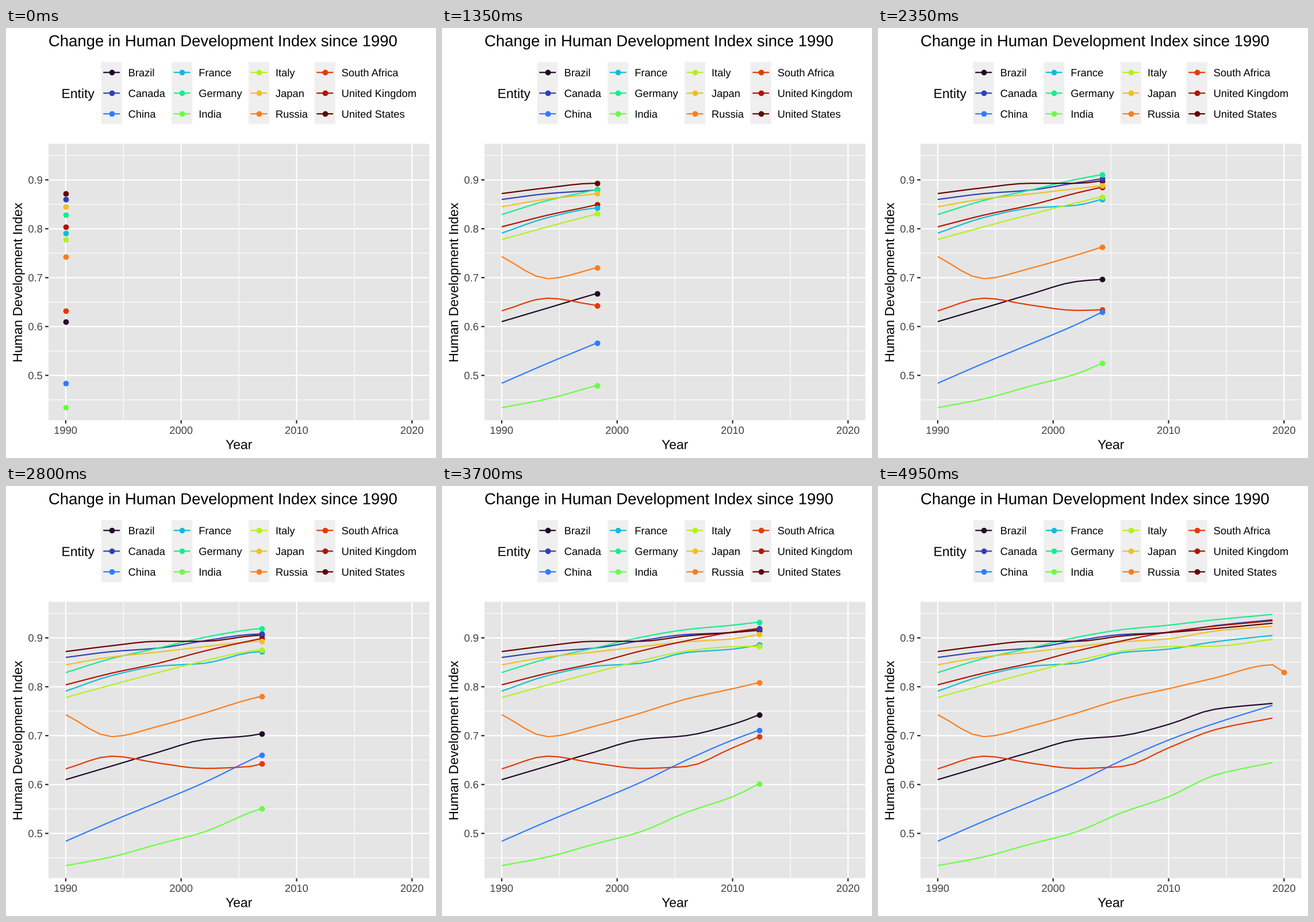
A matplotlib script that plays this animation: 748x748 px, repeating every 5000 ms.

```python
import numpy as np
import matplotlib.pyplot as plt
from matplotlib.animation import FuncAnimation
from matplotlib.patches import PathPatch, Rectangle
from matplotlib.textpath import TextPath
from matplotlib.transforms import Affine2D

SIZE, DPI, FRAMES = 748, 100, 100
PT = 72 / DPI  # points per pixel
LINE, THIN, DOT = 2.2 * PT, 1.1 * PT, 9.8 * PT
LEFT, RIGHT, TOP, BOTTOM = 73.9, 736.5, 201.5, 682.2
SMALL, MEDIUM, LARGE = 18.33, 22.92, 27.5
START = 1990
KEY_STEPS = np.array([0, 4, 8, 12, 16, 20, 24, 29, 30])

# Index in thousandths at each key step
COUNTRIES = {
    "Brazil": (610, 638, 666, 692, 700, 723, 754, 766),
    "Canada": (860, 872, 879, 894, 907, 911, 925, 937),
    "China": (484, 525, 564, 604, 650, 691, 725, 762),
    "France": (791, 823, 842, 848, 870, 877, 892, 905),
    "Germany": (829, 858, 879, 901, 917, 926, 937, 948),
    "India": (434, 452, 478, 503, 543, 575, 619, 645),
    "Italy": (778, 804, 829, 853, 873, 882, 883, 897),
    "Japan": (845, 861, 871, 882, 892, 898, 914, 924),
    "Russia": (743, 698, 719, 746, 775, 796, 818, 845, 830),
    "South Africa": (632, 658, 644, 633, 637, 675, 712, 736),
    "United Kingdom": (804, 828, 848, 873, 894, 912, 924, 935),
    "United States": (872, 884, 893, 893, 904, 911, 919, 930),
}

plt.rcParams["font.family"] = "Liberation Sans"

fig = plt.figure(figsize=(SIZE / DPI, SIZE / DPI), dpi=DPI, facecolor="white")
ax = fig.add_axes([0, 0, 1, 1])
ax.set_xlim(0, SIZE)
ax.set_ylim(SIZE, 0)
ax.axis("off")


def px(step):
    return 103.9 + 20.08 * np.asarray(step)


def py(value):
    return 264.2 + 850.3 * (0.9 - np.asarray(value))


def label(x, y, text, size, color="black", align=None, angle=0):
    """Text on a baseline at (x, y); align is None, 0.5 or 1."""
    path = TextPath((0, 0), text, size=size)
    ink = path.get_extents()
    shift = 0 if align is None else -(ink.x0 + align * ink.width)
    place = (Affine2D().translate(shift, 0).scale(1, -1)
             .rotate_deg(-angle).translate(x, y))
    ax.add_patch(PathPatch(path, fc=color, lw=0, snap=False,
                           transform=place + ax.transData))


def rule(x, y, width, color, z):
    ax.plot(x, y, color=color, lw=width, zorder=z, snap=False,
            solid_capstyle="butt")


def box(x, y, w, h, color):
    ax.add_patch(Rectangle((x, y), w, h, fc=color, lw=0, zorder=0, snap=False))


def smooth(x, kx, ky):
    """Monotone cubic curve through the key points."""
    h = np.diff(kx)
    d = np.diff(ky) / h
    before, after = d[:-1], d[1:]
    same = before * after > 0
    total = np.where(same, before + after, 1)
    inner = np.where(same, 2 * before * after / total, 0)
    slope = np.concatenate([d[:1], inner, d[-1:]])
    i = np.clip(np.searchsorted(kx, x, side="right") - 1, 0, len(h) - 1)
    t = (x - kx[i]) / h[i]
    ease = t * t * (3 - 2 * t)
    return (ky[i] + ease * (ky[i + 1] - ky[i])
            + h[i] * t * (1 - t) * ((1 - t) * slope[i] - t * slope[i + 1]))


def draw_panel():
    box(LEFT, TOP, RIGHT - LEFT, BOTTOM - TOP, "#e5e5e5")
    for step in range(0, 31, 5):
        major = step % 10 == 0
        x = px(step)
        rule([x, x], [TOP, BOTTOM], LINE if major else THIN, "white", 1)
        if major:
            rule([x, x], [BOTTOM, BOTTOM + 5.7], LINE, "#262626", 1)
            label(x, 706, str(START + step), SMALL, "#404040", 0.5)
    for twentieth in range(9, 20):
        major = twentieth % 2 == 0
        y = py(twentieth / 20)
        rule([LEFT, RIGHT], [y, y], LINE if major else THIN, "white", 1)
        if major:
            rule([LEFT - 5.7, LEFT], [y, y], LINE, "#262626", 1)
            label(63, y + 6.5, f"{twentieth / 20:.1f}", SMALL, "#404040", 1)
    label(73.9, 31.7, "Change in Human Development Index since 1990", LARGE)
    label(405.2, 732.4, "Year", MEDIUM, align=0.5)
    label(28, 442, "Human Development Index", MEDIUM, align=0.5, angle=90)
    label(96.5, 121.8, "Entity", MEDIUM)


def draw_key(name, color, x, y):
    box(x, y, 36, 36, "#efefef")
    rule([x + 3.6, x + 32.4], [y + 18, y + 18], LINE, color, 3)
    ax.plot([x + 18], [y + 18], "o", color=color, ms=DOT, mew=0, zorder=4)
    label(x + 47, y + 24.7, name, SMALL)


class Series:
    def __init__(self, color, keys, line_z, dot_z):
        kx = KEY_STEPS[:len(keys)]
        self.steps = np.arange(kx[-1] + 1)
        self.values = smooth(self.steps, kx, np.array(keys) / 1000)
        self.line, = ax.plot([], [], color=color, lw=LINE, zorder=line_z,
                             snap=False, solid_capstyle="butt",
                             solid_joinstyle="round")
        self.dot, = ax.plot([], [], "o", color=color, ms=DOT, mew=0,
                            zorder=dot_z)

    def reveal(self, now):
        past = self.steps < now
        end = min(now, self.steps[-1])
        tip = np.interp(end, self.steps, self.values)
        xs = px(np.append(self.steps[past], end))
        ys = py(np.append(self.values[past], tip))
        self.line.set_data(xs, ys)
        self.dot.set_data(xs[-1:], ys[-1:])
        self.dot.set_visible(now <= self.steps[-1])


draw_panel()
count = len(COUNTRIES)
colors = plt.cm.turbo(np.linspace(0, 1, count))[:, :3] ** 1.25
columns = (165.6, 288.2, 421.9, 536.6)
series = []
for n, (name, keys) in enumerate(COUNTRIES.items()):
    draw_key(name, colors[n], columns[n // 3], 59.3 + 36 * (n % 3))
    series.append(Series(colors[n], keys, 3 + n / count,
                         4 + (n + 3) % count / count))

# Each year lands on a whole frame; time runs evenly between those
year_steps = np.arange(31)
year_frames = np.round(year_steps * (FRAMES - 1) / 30)


def update(i):
    now = np.interp(i, year_frames, year_steps)
    for s in series:
        s.reveal(now)
    return []


anim = FuncAnimation(fig, update, frames=FRAMES, interval=50, repeat=True,
                     repeat_delay=0, init_func=lambda: update(0))
plt.show()
```
